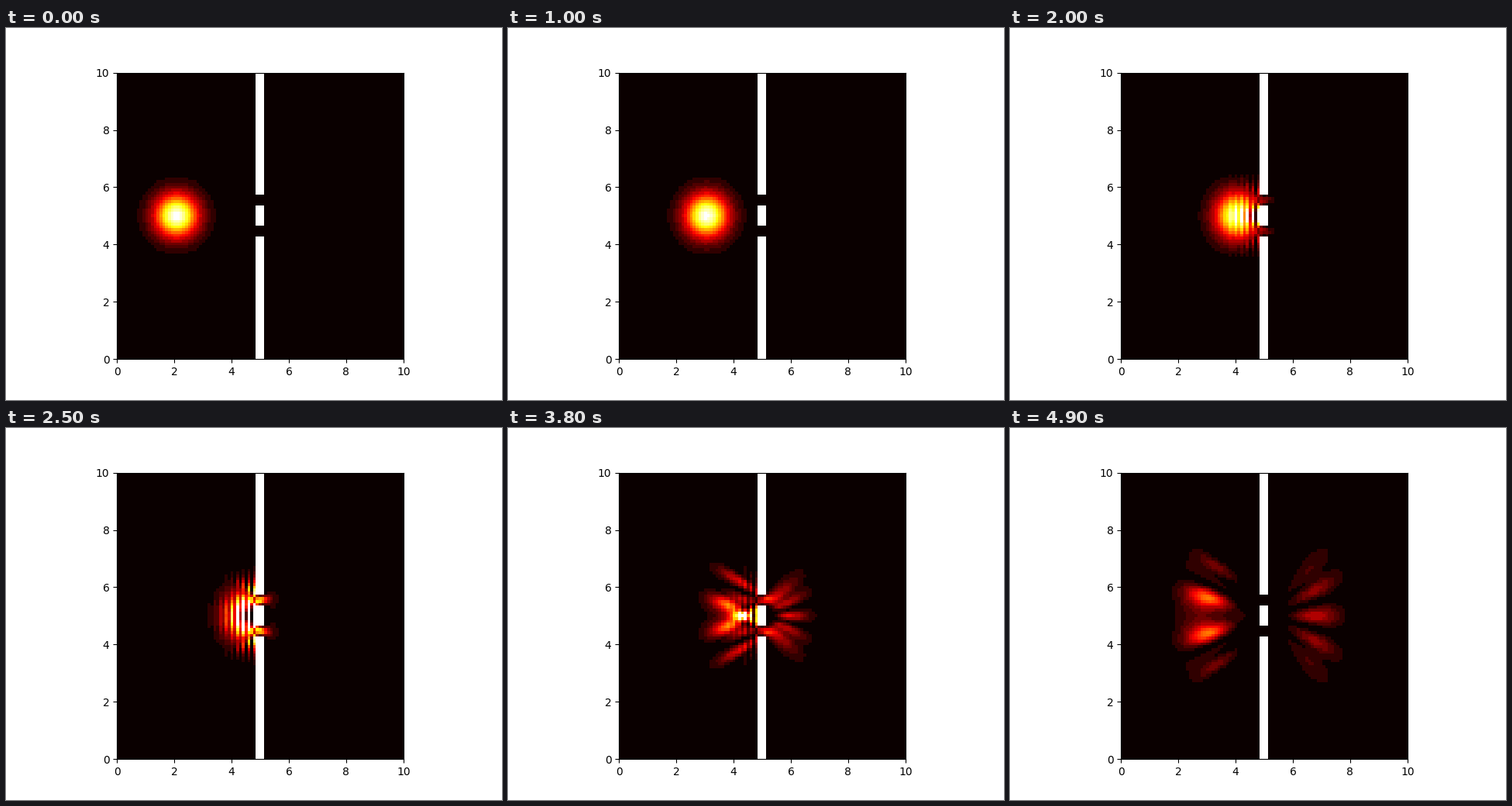
Animation of 640 by 480 pixels, one loop 5 s. Source, as a matplotlib script:

```python
import numpy as np
import matplotlib.pyplot as plt
from matplotlib.animation import FuncAnimation
from matplotlib.colors import ListedColormap

FRAMES, INTERVAL = 50, 100
SIZE, N = 10.0, 101
STEP = SIZE / (N - 1)
SUBSTEPS = 10
DT = 0.01 / SUBSTEPS

# Wall with two slits
row, col = np.mgrid[:N, :N]
offset = abs(row - N // 2)
wall = (abs(col - N // 2) <= 1) & ((offset <= 3) | (offset >= 8))
free = ~wall


def wave_packet(x0=2.05, y0=5.0, width=0.75, k=5 * np.pi):
    x, y = col * STEP, row * STEP
    r2 = (x - x0) ** 2 + (y - y0) ** 2
    return free * np.exp(-r2 / (2 * width ** 2) + 1j * k * (x - x0))


def derivative(psi):
    """Free Schroedinger equation, with psi held at zero on the walls."""
    lap = -4 * psi
    lap[1:] += psi[:-1]
    lap[:-1] += psi[1:]
    lap[:, 1:] += psi[:, :-1]
    lap[:, :-1] += psi[:, 1:]
    return 0.5j / STEP ** 2 * lap * free


def rk4(psi):
    a = derivative(psi)
    b = derivative(psi + DT / 2 * a)
    c = derivative(psi + DT / 2 * b)
    d = derivative(psi + DT * c)
    return psi + DT / 6 * (a + 2 * b + 2 * c + d)


def simulate():
    psi, densities = wave_packet(), []
    for _ in range(FRAMES):
        densities.append(np.ma.array(abs(psi) ** 2, mask=wall))
        for _ in range(SUBSTEPS):
            psi = rk4(psi)
    return densities


def banded_hot():
    """The hot colormap reduced to coarse bands per channel."""
    rgb = plt.get_cmap("hot")(np.arange(256), bytes=True)[:, :3].astype(int)
    band = np.array([32, 16, 32])
    out = np.where((rgb == 0) | (rgb == 255), rgb, rgb // band * band + band // 2)
    out[rgb[:, 0] < 32] = (10, 0, 0)
    out[rgb[:, 2] >= 224] = 255
    cmap = ListedColormap(out / 255)
    cmap.set_bad("white")
    return cmap


densities = simulate()

fig, ax = plt.subplots(figsize=(6.4, 4.8), dpi=100)
image = ax.imshow(densities[0], cmap=banded_hot(), extent=[0, SIZE, 0, SIZE],
                  origin="lower", interpolation="nearest",
                  vmin=0, vmax=densities[0].max())


def update(i):
    image.set_data(densities[i])
    return (image,)


anim = FuncAnimation(fig, update, frames=FRAMES, interval=INTERVAL,
                     init_func=lambda: update(0), repeat=True, repeat_delay=0)
plt.show()
```
